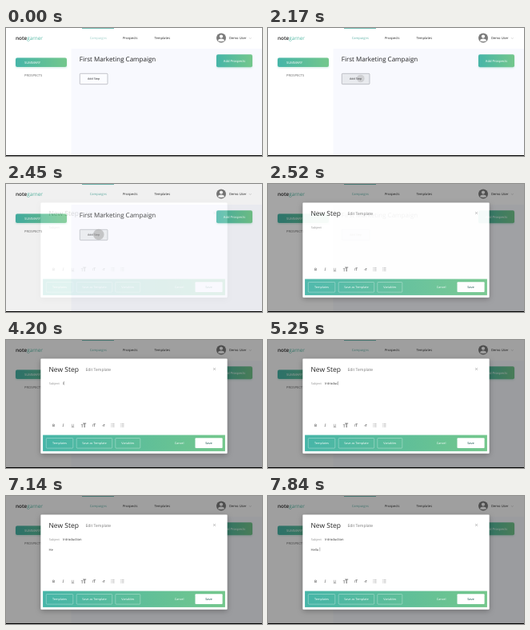
These frames come from a looping animation (320 by 161 pixels, 8 s). An HTML page:

```html
<!DOCTYPE html>
<html lang="en">
<head>
<meta charset="utf-8">
<title>New campaign step</title>
<style>
  html, body { margin: 0; width: 100%; height: 100%; overflow: hidden; background: #fff; }
  svg { display: block; width: 100vw; height: 100vh; }
  text { font-family: "Open Sans", sans-serif; font-size: 4.1px; fill: #222; text-rendering: geometricPrecision; white-space: pre; }
  .mid { text-anchor: middle; }
  .light { fill: #fff; }
  .line { fill: none; stroke: #888; stroke-width: .5; }
</style>
</head>
<body>
<svg viewBox="0 0 320 161">
  <defs>
    <linearGradient id="green">
      <stop offset="0" stop-color="#46b5a8"/>
      <stop offset="1" stop-color="#74c78c"/>
    </linearGradient>
    <filter id="soft" x="-10%" y="-20%" width="120%" height="150%">
      <feDropShadow dx="0" dy="1" stdDeviation="1.2" flood-color="#57b99c" flood-opacity=".3"/>
    </filter>
    <filter id="lift" x="-10%" y="-15%" width="120%" height="135%">
      <feDropShadow dx="0" dy="2" stdDeviation="3.5" flood-color="#000" flood-opacity=".28"/>
    </filter>
  </defs>

  <g id="page">
    <rect width="320" height="161" fill="#fff"/>
    <rect x="81.5" y="26" width="238.5" height="135" fill="#f8f9fe"/>
    <rect x="95" width="40" height="1" fill="#76bfb6"/>
    <text x="12" y="14.8" style="font-size:6.4px"><tspan font-weight="600">note</tspan><tspan fill="#55b9a5">garner</tspan></text>
    <text id="tab" class="mid" x="115.3" y="14.2">Campaigns</text>
    <text class="mid" x="155.2" y="14.2">Prospects</text>
    <text class="mid" x="195.3" y="14.2">Templates</text>
    <circle cx="269" cy="12.5" r="6" fill="#7c7c7c"/>
    <circle cx="269" cy="10.6" r="2.1" fill="#fff"/>
    <path d="M265 16.2q0-2.8 4-2.8t4 2.8q-4 1.6-8 0" fill="#fff"/>
    <text x="279" y="14.2">Demo User</text>
    <path class="line" d="M304 12.2l1.3 1.3 1.3-1.3" style="stroke:#aaa"/>

    <rect x="12" y="37.5" width="64" height="11.5" rx="2" fill="url(#green)" filter="url(#soft)"/>
    <text class="light" x="23" y="44.8">SUMMARY</text>
    <text x="23" y="60.6" style="fill:#666">PROSPECTS</text>
    <text x="91.8" y="42" style="font-size:8px">First Marketing Campaign</text>
    <rect x="263" y="33.3" width="45" height="16" rx="2" fill="url(#green)" filter="url(#soft)"/>
    <text class="mid light" x="285.5" y="42.8">Add Prospects</text>
    <rect id="add" x="92.3" y="57.3" width="34.7" height="13.4" rx="1" stroke="#8a8d94" stroke-width=".5"/>
    <text class="mid" x="109.6" y="65.3" style="font-size:3.6px">Add Step</text>
    <circle id="touch" cx="115.8" cy="63.5" fill="#858585"/>
  </g>

  <g id="dialog">
    <rect width="320" height="161" fill="#000" opacity=".375"/>
    <rect x="43.4" y="23.4" width="233.2" height="119.3" rx="1" fill="#fff" filter="url(#lift)"/>
    <text x="53.4" y="39.8" style="font-size:8.5px">New Step</text>
    <text x="99.4" y="38.6" style="font-size:5px;fill:#777">Edit Template</text>
    <path class="line" d="M259 35l3 3m0-3l-3 3"/>
    <text x="53.8" y="56" style="font-size:3.8px;fill:#888">Subject</text>
    <text id="subject" x="71" y="56.1" style="fill:#333"></text>
    <text id="body" x="53.4" y="68.8" style="fill:#444"></text>
    <rect id="caret" width=".5" height="4.8" fill="#777"/>
    <g id="tools"></g>
    <rect x="46.1" y="119.5" width="227.8" height="20.4" fill="url(#green)"/>
    <g id="actions"></g>
    <text class="mid light" x="216.5" y="131" style="font-size:3.8px">Cancel</text>
    <rect x="236.5" y="123.3" width="34.1" height="12.8" rx="1" fill="#fff"/>
    <text class="mid" x="253.5" y="131" style="font-size:3.8px;font-weight:600;fill:#386b65">Save</text>
  </g>
  <rect y="160" width="320" height="1" fill="#000"/>
</svg>
<script>
const LOOP = 8000;
const $ = id => document.getElementById(id);
const set = (el, attrs) => { for (const k in attrs) el.setAttribute(k, attrs[k]); };

function add(parent, tag, attrs, label = "") {
  const el = document.createElementNS("http://www.w3.org/2000/svg", tag);
  set(el, attrs);
  el.textContent = label;
  parent.append(el);
}

function tool(x, label, size, style = "") {
  const y = 107 + size * .36;
  add($("tools"), "text", { class: "mid", x, y, style: `font-size:${size}px;fill:#555;${style}` }, label);
}
tool(59.5, "B", 4.6, "font-weight:600");
tool(71.3, "I", 4.8, "font-family:'Noto Serif',serif;font-style:italic");
tool(83.5, "U", 4.6, "text-decoration:underline");

// Text size icons: a small T beside a larger one on the same baseline
for (const [x, size] of [[97, 7.6], [110, 5.2], [122, 4.2]]) {
  const y = 107 + size * .36;
  for (const [dx, scale] of [[-.26, .65], [.16, 1]])
    add($("tools"), "text", { class: "mid", x: x + size * dx, y, style: `font-size:${size * scale}px;fill:#555;font-weight:600` }, "T");
}
for (const x of [133.3, 145.2])
  add($("tools"), "path", { class: "line", d: `M${x - 2.3} 105.4h.8m.8 0h3m-4.6 1.8h.8m.8 0h3m-4.6 1.8h.8m.8 0h3` });

for (const [x, width, label] of [[50.3, 33.5, "Templates"], [88.2, 44.5, "Save as Template"], [136.8, 31, "Variables"]]) {
  add($("actions"), "rect", { x, y: 123.5, width, height: 12.6, rx: 1, fill: "none", stroke: "#fff", "stroke-width": .4, "stroke-opacity": .75 });
  add($("actions"), "text", { class: "mid light", x: x + width / 2, y: 131, style: "font-size:3.8px" }, label);
}

// Moment at which each character is typed
const subjectKeys = [4200, 4410, 4480, 4620, 4690, 4900, 5040, 5250, 5460, 5530, 5600, 5740];
const bodyKeys = [6790, 7140, 7210, 7350, 7560, 7840];
const typed = (word, keys, t) => word.slice(0, keys.filter(k => k <= t).length);
const during = (t, from, to) => t >= from && t < to;

function placeCaret(field, visible) {
  const x = +field.getAttribute("x") + (field.textContent ? field.getComputedTextLength() + .3 : .2);
  set($("caret"), { x, y: field.getAttribute("y") - 4.2, opacity: visible ? 1 : 0 });
}

function draw(t) {
  $("tab").style.fill = t < 210 ? "#9ccdc7" : "#62b3a9";
  set($("add"), { fill: t < 2170 ? "#fbfcff" : "#e8eaee" });
  set($("touch"), { r: t < 2310 ? 4.8 : 6.8, opacity: t < 2170 || t >= 2520 ? 0 : t < 2310 ? .25 : .48 });
  set($("dialog"), { opacity: t < 2450 ? 0 : t < 2520 ? .16 : t < 2590 ? .94 : 1 });

  $("subject").textContent = typed("Introduction", subjectKeys, t);
  $("body").textContent = typed("Hello ", bodyKeys, t);
  if (t < 6300) placeCaret($("subject"), during(t, 3360, 3850) || t >= 4200);
  else placeCaret($("body"), t < 6790 || during(t, 6860, 7140) || t >= 7840);
}

function tick(now) {
  draw(now % LOOP);
  requestAnimationFrame(tick);
}
draw(0);
requestAnimationFrame(tick);
</script>
</body>
</html>
```
